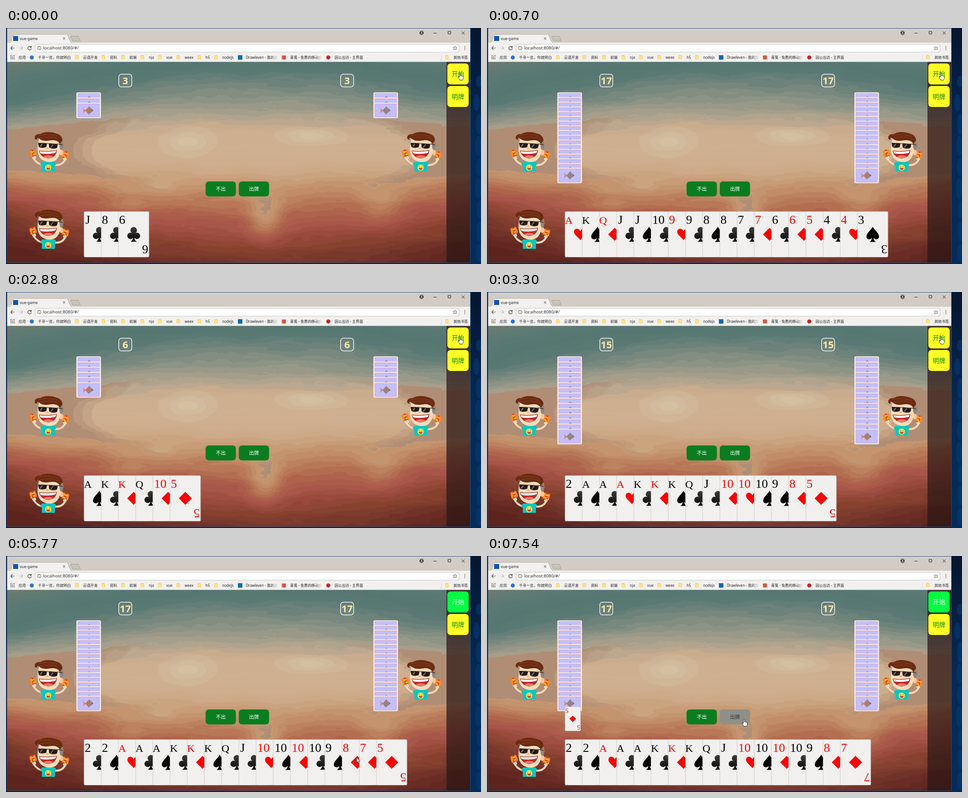
These frames come from a looping animation (1059 px wide and 529 px high, 8 s). An HTML page with a canvas:

```html
<!DOCTYPE html>
<html lang="en">
<head>
<meta charset="utf-8">
<title>Card table</title>
<style>
  html, body { margin: 0; width: 100%; height: 100%; overflow: hidden; background: #0a2145; }
  body { position: relative; font: 8.15px/12px 'Noto Sans', 'Noto Sans CJK SC', 'Noto Sans CJK', sans-serif; color: #222; }
  canvas, #stage, #marks { position: absolute; }
  canvas { left: 2px; top: 76px; }
  #stage { left: 0; top: 0; width: 1059px; height: 529px; }
  #marks { left: 10px; top: 60px; width: 1020px; display: flex; }
  #marks span { display: flex; margin-right: 9.2px; white-space: nowrap; }
  #marks span:last-child { margin: 0 0 0 auto; }
  #marks svg { flex: none; width: 18px; height: 12px; }
  #marks b { font-weight: normal; max-width: 74px; overflow: hidden; }
  #marks .cut { mask-image: linear-gradient(to right, #000 80%, transparent); }
  text { white-space: pre; }
  .rank { font-family: 'Liberation Serif', 'Noto Serif', serif; }
  .mid, .rank { text-anchor: middle; }
</style>
</head>
<body>
<canvas id="land" width="1033" height="450"></canvas>
<svg id="stage" viewBox="0 0 1059 529">
  <defs>
    <linearGradient id="ink" x2="0" y2="1"><stop stop-color="#3c3c3c"/><stop offset="1" stop-color="#080808"/></linearGradient>
    <linearGradient id="desk" x2="0" y2="1"><stop stop-color="#05162f"/><stop offset=".5" stop-color="#052a57"/><stop offset="1" stop-color="#042c5a"/></linearGradient>
    <g id="♦"><path fill="#fa0204" d="M0-14.5L14.5 0 0 14.5-14.5 0Z"/></g>
    <g id="♥"><path fill="#fa0204" d="M0 13C-4 7-14 1-14-5.5C-14-14-3-15 0-6.5C3-15 14-14 14-5.5C14 1 4 7 0 13Z"/></g>
    <g id="♠"><path d="M0-17C4-9 14-3 14 5C14 12 5 13 2 8C2 13 4 15 7 17H-7C-4 15-2 13-2 8C-5 13-14 12-14 5C-14-3-4-9 0-17Z"/></g>
    <g id="♣"><path fill="url(#ink)" d="M-4-3A7.3 7.3 0 1 1 4-3A7.1 7.1 0 1 1 1.5 7.5C2 12 4 15 7 16.5H-7C-4 15-2 12-1.5 7.5A7.1 7.1 0 1 1-4-3Z"/></g>
    <g id="fish">
      <path fill="#dd7f6a" d="M-13-5L-6-1-6 1-12 6-10 0Z"/>
      <path fill="#a08486" d="M-7 0Q-1-6 2-9.5Q5-6 12 0Q5 5 1 9Q-2 5-7 0Z"/>
      <path fill="none" stroke="#d8744e" stroke-width="1.5" d="M-3-3V3M1-6V6M5-4V4"/>
      <path fill="none" stroke="#5f8a94" d="M-1-5V5M3-6V6M7.5-2V2"/>
      <circle cx="9" cy="-.7" r=".8" fill="#222"/>
    </g>
    <g id="back">
      <rect width="54.5" height="34.5" rx="2.5" fill="#f8f0f0" stroke="#cfc3c3" stroke-width=".4"/>
      <rect x="3" y="2.5" width="48.5" height="29.5" fill="#c3bffb" stroke="#e06a74" stroke-width=".8" stroke-dasharray="2.4 1.4"/>
      <use href="#fish" x="26.5" y="17.5"/>
    </g>
    <g id="packet">
      <path fill="#e2401d" d="M-8-5L-3-8 5-9 9 3 2 9-5 8Z"/>
      <path fill="#f98a28" d="M-8-5L-3-7-1 8-5 8ZM1-9L5-9 9 3 5 5Z"/>
      <path fill="#ffc23a" d="M-4-4L2-6 3-3-3-1ZM0 1L5 0 5 3 1 5Z"/>
    </g>
    <g id="player">
      <path fill="none" stroke="#fbd5b0" stroke-width="4" d="M30 74Q16 70 10 58M57 74Q74 76 81 62"/>
      <use href="#packet" x="9" y="48"/>
      <use href="#packet" transform="translate(82 52) scale(-1 1)"/>
      <path fill="#fbd5b0" stroke="#fff3e6" stroke-width=".8" d="M7 57L14 54 16 59 11 62ZM76 60L82 57 84 62 79 64Z"/>
      <path fill="#10c5be" d="M30 67H57L61 71 58 76V88H29V77L25 72Z"/>
      <ellipse cx="72.5" cy="46" rx="4.5" ry="6.5" fill="#f7c49b"/>
      <path fill="#fcdcba" d="M23 15C19 28 18 44 22 53C28 67 48 71 59 64C69 57 73 40 71 18Z"/>
      <path fill="#8a8782" d="M66 15C77 16 80 32 74 41L69 38 68 26Z"/>
      <path fill="#6b2a12" d="M13 13C13 7 19 4 25 5C33-1 49-1 59 3C69 5 75 11 75 19L69 27C66 20 58 17 47 19C36 21 28 20 22 14C19 12 16 14 19 17C15 18 13 16 13 13Z"/>
      <path fill="none" stroke="#8d4322" d="M20 9Q38 2 66 10M25 14Q46 8 68 16"/>
      <path fill="none" stroke="#4b2113" stroke-width="1.4" d="M21 25L66 27 75 29"/>
      <path fill="#251915" stroke="#f3e3ce" stroke-width=".6" d="M20 24L41 25 39 34Q30 38 22 34ZM44 25L65 27 63 36Q53 40 45 35Z"/>
      <path stroke="#8c7c73" stroke-width="2" d="M25 33L30 27M49 35L54 28"/>
      <path fill="#f2b48b" d="M38 35Q42 33 44 37Q42 40 38 38Z"/>
      <path fill="#c3262b" stroke="#8c2a20" stroke-width=".7" d="M23 42Q42 45 62 41Q61 57 43 59Q26 57 23 42Z"/>
      <path fill="#fff" d="M24 43Q42 46 61 42L59 47Q42 51 26 48Z"/>
      <ellipse cx="43" cy="55.5" rx="10" ry="3" fill="#f3796b"/>
      <circle cx="43" cy="80" r="7" fill="#ffe04a"/>
      <path fill="#d9432a" d="M38.5 80.5H47.5Q46 85.5 43 85.5Q40 85.5 38.5 80.5Z"/>
      <path fill="none" stroke="#6b4b14" d="M39 78L41 77.5M45 77.5L47 78"/>
    </g>
    <g id="arrow"><path fill="#fff" stroke="#111" stroke-width=".9" d="M.4.4V12.2L3.1 9.8 5 14.2 6.9 13.4 5.1 9.2H8.8Z"/></g>
    <g id="hand"><path fill="#fff" stroke="#111" stroke-width=".9" stroke-linejoin="round" d="M-1.3 1.2C-1.3-.4 1.1-.4 1.1 1.2V6Q2.5 4.8 3.4 6.4Q4.7 5.4 5.5 7Q7.4 6.4 7.4 8.4V11.2Q7.2 13.6 5.8 15.8H-.4Q-1.2 13-4.2 9.8Q-4.4 7.6-2.6 8.4L-1.3 9.6Z"/></g>
  </defs>
  <g id="still"></g>
  <g id="live"></g>
</svg>
<div id="marks"></div>
<script>
const LOOP = 8000, TICK = 143, LEAD = 40;
const $ = id => document.getElementById(id);
const clamp = v => Math.max(0, Math.min(1, v));
const mix = (a, b, u) => a + (b - a) * u;
const use = (id, x, y) => `<use href="#${id}" x="${x}" y="${y}"/>`;
const rect = (x, y, w, h, fill, more = '') => `<rect x="${x}" y="${y}" width="${w}" height="${h}" fill="${fill}" ${more}/>`;
const text = (x, y, size, s, fill = '#222', more = '') => `<text x="${x}" y="${y}" font-size="${size}" fill="${fill}" ${more}>${s}</text>`;
const line = (d, color = '#555', w = 1) => `<path d="${d}" fill="none" stroke="${color}" stroke-width="${w}"/>`;
const dot = (x, y, r, fill) => `<circle cx="${x}" cy="${y}" r="${r}" fill="${fill}"/>`;

// Backdrop: a colour ramp over a warped height, cut into hard bands
const rgb = s => s.match(/../g).map(h => parseInt(h, 16));
const ramp = ('6c7b72 5f7a73 587873 567771 5a7974 6c827a 838e82 9a9988 b0a48f c9ac8e ceaf90 cfb090 ceae8e ' +
  'ccaa88 c79c76 c18c68 b87858 ae644c a8554a 994a3c 87412f 78382c 6a2c24 5c241d').split(' ').map(rgb);
const [brown, pale, shade] = ['b08e75', 'd4c4a8', '2c1614'].map(rgb);
const drips = [[270, 395, 50, 40, 25], [347, 354, 30, 18, 22], [578, 425, 36, 50, 70], [840, 400, 50, 40, 45]];
const glows = [[405, 255, 50, 25], [680, 242, 62, 17]];

const hash = (x, y) => { const s = Math.sin(x * 127.1 + y * 311.7) * 43758.5453; return s - Math.floor(s); };
function noise(x, y) {
  const i = Math.floor(x), j = Math.floor(y), ease = u => u * u * (3 - 2 * u);
  const u = ease(x - i), v = ease(y - j);
  return mix(mix(hash(i, j), hash(i + 1, j), u), mix(hash(i, j + 1), hash(i + 1, j + 1), u), v) - .5;
}
const bump = (x, y, [cx, cy, rx, ry]) => Math.exp(-(((x - cx) / rx) ** 2) - ((y - cy) / ry) ** 2);

function landColor(x, y) {
  const rough = 16 * noise(x / 90, y / 18) + 9 * noise(x / 24, y / 5) + 3 * noise(x / 6, y / 2);
  const bend = 85 * ((x - 560) / 560) ** 2 * Math.max(-1, Math.min(1, (y - 275) / 125));
  const h = drips.reduce((s, d) => s - d[4] * bump(x, y, d), y + bend + rough);
  const level = Math.round(Math.max(0, Math.min(ramp.length - 1, (h + 5) / 25)) * 2) / 2;
  const low = Math.floor(level), high = Math.min(low + 1, ramp.length - 1);
  const ring = ((x - 548) / 365) ** 2 + ((y - 275 + rough) / 95) ** 2;
  const side = h > 190 && h < 350 ? Math.round(clamp((ring - .9) / .35) * 3) / 3 : 0;
  const glow = Math.round(Math.max(...glows.map(g => bump(x, y + rough / 2, g))) * 3) / 3;
  return ramp[low].map((c, i) =>
    mix(mix(mix(mix(c, ramp[high][i], level - low), brown[i], side), pale[i], glow * .8), shade[i], x > 981 ? .72 : 0));
}

function paintLand() {
  const { width, height } = $('land'), ctx = $('land').getContext('2d');
  const img = ctx.createImageData(width, height);
  for (let y = 0; y < height; y++)
    for (let x = 0; x < width; x++)
      img.data.set([...landColor(x + 2, y + 76), 255], (y * width + x) * 4);
  ctx.putImageData(img, 0, 0);
}

function browser() {
  return rect(1036, 0, 23, 529, 'url(#desk)') +
    Array.from({ length: 9 }, (_, i) =>
      `<ellipse cx="${1048 + 8 * hash(i, 1)}" cy="${120 + i * 48}" rx="7" ry="${12 + 14 * hash(i, 2)}" fill="#063a70" opacity=".6"/>`).join('') +
    `<rect x="2" y=".5" width="1033.5" height="526" fill="none" stroke="#1b4f86"/>` +
    rect(2.5, 1, 1032.5, 32, '#d2ccc4') + rect(2.5, 33, 1032.5, 43, '#f2f1f0') +
    `<path d="M7 33.5Q10 32 12 27L16 17Q17 14.5 20 14.5H134Q137 14.5 138 17L142 27Q144 32 147 33.5" fill="#f2f1f0" stroke="#a8a39c" stroke-width=".7"/>` +
    `<path d="M144 18.5H161L166 29.5H149Z" fill="#c9c3bb" stroke="#a09a93" stroke-width=".8"/>` +
    rect(16, 18, 11, 11, '#1450b8') + text(31, 27, 8.5, 'vue-game') + line('M127 21L132 26M132 21L127 26', '#333') +
    dot(926.5, 11, 4.7, '#47443f') + dot(926.5, 9.3, 1.5, '#d2ccc4') + line('M923.8 13.8Q926.5 10.8 929.2 13.8', '#d2ccc4', 1.2) +
    line('M953 11.5H960M985.5 7.5H991.5V13.5H985.5ZM1016 8L1022.5 14.5M1022.5 8L1016 14.5', '#222') +
    line('M19 45H10.5M14.5 41L10.5 45 14.5 49', '#444', 1.2) + line('M29 45H37.5M33.5 41L37.5 45 33.5 49', '#bcbab7', 1.2) +
    line('M55.6 42.5A4 4 0 1 0 56.5 46M56.3 40.3V43.3H53.3', '#444', 1.2) +
    rect(65, 36.5, 945, 17.5, '#fff', 'rx="2" stroke="#bdbab6" stroke-width=".8"') +
    `<circle cx="74" cy="45" r="4" fill="none" stroke="#555"/>` + line('M74 44.2V47.3M74 42.3V43.3') +
    text(83, 48.4, 9.7, 'localhost:8080/#/') +
    line('M1001 40.8L1002.3 43.8 1005.3 44 1003 46 1003.8 49 1001 47.3 998.2 49 999 46 996.7 44 999.7 43.8Z', '#555', .9) +
    [-3.5, 0, 3.5].map(d => dot(1023, 45 + d, 1, '#555')).join('') +
    line('M970.5 61V72M2.5 75.7H1035', '#cbc8c4', .8);
}

function bookmarks() {
  const folder = `<path fill="#f6cf62" d="M0 1H7V3H8V10H0Z"/><path fill="#ffe395" d="M1 3H7V9H1Z"/>`;
  const hues = ['#e8453c', '#f7b529', '#34a853', '#4285f4'];
  const apps = Array.from({ length: 9 }, (_, i) => rect(i % 3 * 3.4, 1 + (i / 3 | 0) * 3.4, 2.3, 2.3, hues[i % 4])).join('');
  const item = (label, icon = folder) =>
    `<span><svg>${icon}</svg><b${label.length > 10 ? ' class="cut"' : ''}>${label}</b></span>`;
  return item('应用', apps) + item('千寻一览，你就明白', dot(4.5, 6, 4.5, '#2f6fdc')) +
    '云语开发 资料 前端 nja vue weex h5 nodejs'.split(' ').map(s => item(s)).join('') +
    item('Drawleven - 我的文', rect(0, 1, 10, 10, '#0b6cad')) + item('青笺 - 免费的移动应', rect(0, 1.5, 9, 9, '#e0563f')) +
    item('因公出访 - 主界面', dot(4.5, 6, 4.5, '#cf2026')).replace(' class="cut"', '') + item('其他书签');
}

// Everything below moves in ticks, the rate at which the screen refreshes
const deals = [
  { start: -1.05, order: 'J♣ 8♣ 6♣ 4♣ 9♥ K♠ 7♦ 5♦ 8♠ A♥ 3♠ 10♣ Q♦ 6♦',
    final: 'A♥ K♠ Q♦ J♣ J♠ 10♣ 9♥ 9♣ 8♠ 8♣ 7♣ 7♦ 6♣ 6♦ 5♦ 4♣ 4♥ 3♠' },
  { start: 18, order: 'K♣ 10♦ A♠ 5♦ Q♣ K♦ 9♠ A♣ 2♣ 8♦ 10♥ K♠ J♣ A♥ 10♠',
    final: '2♣ 2♠ A♥ A♣ A♠ K♣ K♦ K♠ Q♣ J♣ 10♥ 10♠ 10♦ 10♣ 9♠ 8♦ 7♦ 5♦' }];
const PER_TICK = 2.85, LEAVE = 28, PICK = 45, HOVER = 51, PLAY = 53;
const ranks = '2 A K Q J 10 9 8 7 6 5 4 3'.split(' ');
const rankOf = c => c.slice(0, -1);

const linear = u => u, speedUp = u => u * u, slowDown = u => 1 - (1 - u) ** 2, hold = () => 0;
const path = [
  { at: 0, x: 1012, y: 101, ease: hold }, { at: 27, x: 1004, y: 108, ease: linear },
  { at: 32, x: 857, y: 255, ease: linear }, { at: 36, x: 708, y: 441, ease: linear },
  { at: 39, x: 728, y: 443, ease: slowDown }, { at: 43, x: 849, y: 461, ease: speedUp },
  { at: 47, x: 702, y: 408, ease: slowDown }, { at: PLAY, x: 573, y: 366, ease: hold }];

function pointer(k) {
  const i = path.findLastIndex(p => p.at <= k), a = path[i], b = path[i + 1] || a;
  const u = a.ease((k - a.at) / (b.at - a.at || 1));
  return use(k < LEAVE || k >= HOVER ? 'hand' : 'arrow', mix(a.x, b.x, u), mix(a.y, b.y, u));
}

function handAt(k) {
  const deal = deals.findLast(d => d.start <= k);
  const n = Math.floor(1 + PER_TICK * (k - deal.start));
  if (n > 15) return deal.final.split(' ').slice(0, n);
  return deal.order.split(' ').slice(0, n).sort((a, b) => ranks.indexOf(rankOf(a)) - ranks.indexOf(rankOf(b)));
}

function card(x, y, code, w = 68, h = 102, k = 1) {
  const rank = rankOf(code), suit = code.slice(-1);
  const size = (/[AKQ]/.test(rank) ? 24 : 27.5) * k;
  const label = text(8.3 * k * rank.length, 27 * k, size, rank, '♥♦'.includes(suit) ? '#fa0204' : '#000', 'class="rank"');
  return `<g transform="translate(${x} ${y})">` +
    rect(0, 0, w, h, '#f1f0ee', 'rx="2" stroke="#c6c3bf" stroke-width=".8"') + label +
    `<g transform="rotate(180 ${w / 2} ${h / 2})">${label}</g>` +
    `<use href="#${suit}" transform="translate(${w / 2} ${h / 2}) scale(${k})"/></g>`;
}

function stack(x, n) {
  const gap = Math.min(11.6, 169 / (n - 1 || 1));
  return Array.from({ length: n }, (_, i) => use('back', x, 144.3 + i * gap)).join('');
}

const counter = (x, n) => rect(x, 103.5, 29, 28.5, '#6f8580', 'rx="6" stroke="#f6f6f2" stroke-width="1.5" fill-opacity=".6"') +
  text(x + 14.5, 126, 22, n, '#fbe9a6', 'class="mid" font-weight="700"');
const button = (x, y, w, h, size, label, fill, ink) => rect(x, y, w, h, fill, 'rx="7"') +
  text(x + w / 2, y + h / 2 + size * .38, size, label, ink, 'class="mid"');
const action = (x, label, fill = '#0a7d20', ink = '#fff') => button(x, 344, 67.5, 33.5, 11, label, fill, ink);
const option = (y, label, fill = '#ffff26', ink = '#0a8a1c') => button(984, y, 47.5, 47, 14, label, fill, ink);

function scene(k) {
  const hand = handAt(k), shown = Math.min(hand.length, 17), last = hand.length - 1;
  const played = k >= PLAY, lift = k >= PICK ? 27 : 0;
  const held = played ? hand.slice(0, last) : hand;
  return counter(251.5, shown) + counter(746, shown) + stack(157, shown) + stack(819.3, shown) +
    action(445, '不出') + (k < HOVER ? action(519, '出牌') : action(519, '出牌', '#8f8f87', '#333')) +
    (k < LEAVE ? option(79.5, '开始') : option(79.5, '开始', '#00ff43', '#fff')) + option(130, '明牌') +
    held.map((c, i) => card(174 + i * 38.35, 411.5 - (i === last ? lift : 0), c)).join('') +
    (played ? card(174, 338, hand[last], 34.5, 54, .5) : '') + pointer(k);
}

paintLand();
$('marks').innerHTML = bookmarks();
$('still').innerHTML = browser() + use('player', 51, 233) + use('player', 881.5, 233) + use('player', 51, 407);

let drawn = -1;
function frame() {
  const k = Math.floor((performance.now() % LOOP + LEAD) / TICK);
  if (k !== drawn) $('live').innerHTML = scene(drawn = k);
  requestAnimationFrame(frame);
}
frame();
</script>
</body>
</html>
```
